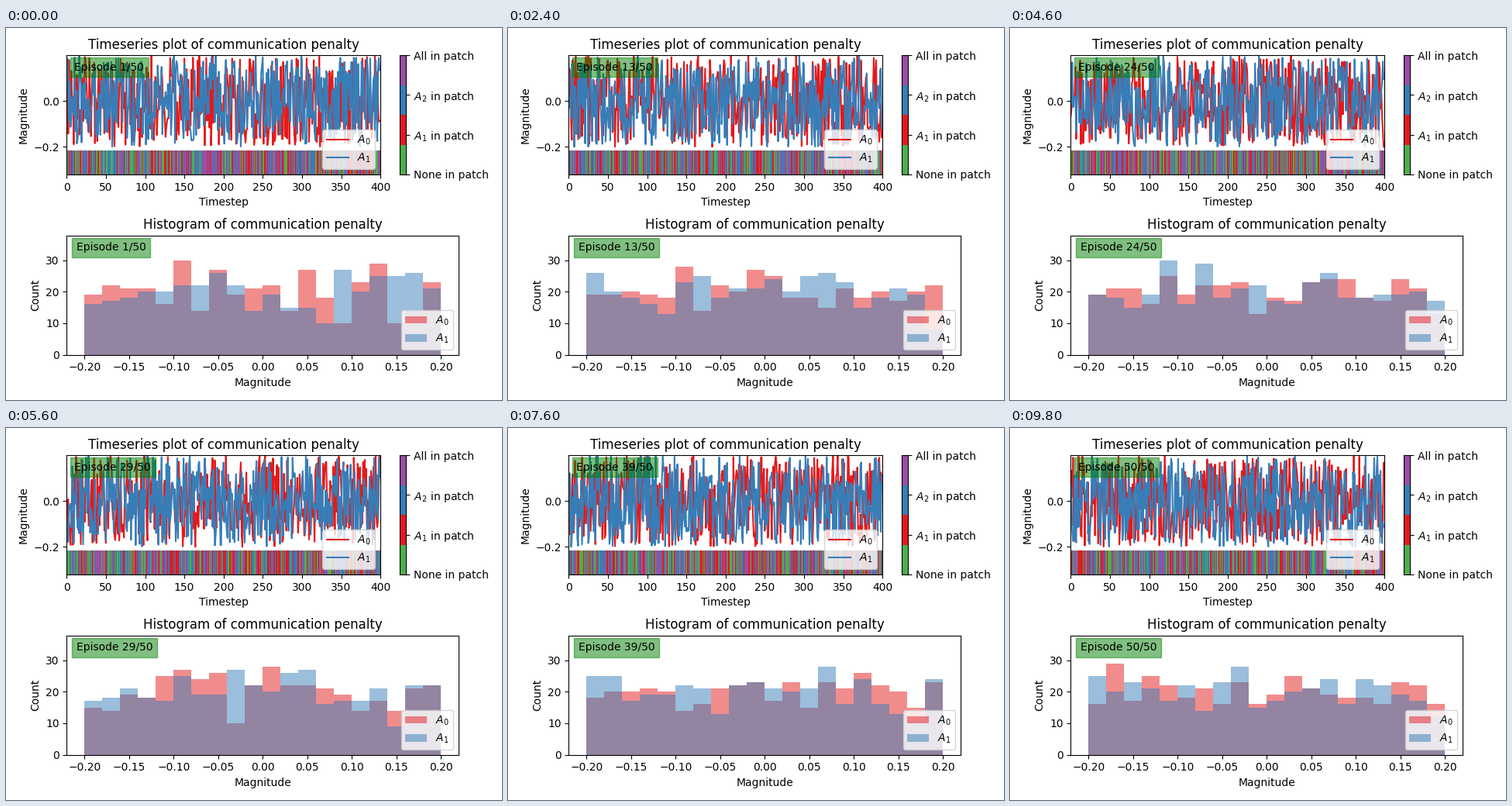
A matplotlib script that plays this animation: 640 px wide and 480 px high, repeating every 10 s.

```python
import numpy as np
import matplotlib.pyplot as plt
from matplotlib.animation import FuncAnimation
from matplotlib.colors import ListedColormap

W, H, DPI = 640, 480, 100
EPISODES, STEPS, BINS = 50, 400, 20
LIMIT = 0.2
MAX_COUNT = 36
GREEN, RED, BLUE, PURPLE = "#4daf4a", "#e41a1c", "#377eb8", "#984ea3"
PATCH_CMAP = ListedColormap([GREEN, RED, BLUE, PURPLE])
EDGES = np.linspace(-LIMIT, LIMIT, BINS + 1)

# Layout in pixels from the top left corner
LEFT, WIDTH, HEIGHT = 78.3, 506, 153.8
SERIES_TOP, HIST_TOP = 35.1, 267.8


def episode_data(episode):
    """Penalty signals of both agents and the patch state at every step."""
    rng = np.random.default_rng(episode)
    return rng.uniform(-LIMIT, LIMIT, (2, STEPS)), rng.integers(0, 4, STEPS)


def pixel_axes(left, top, width):
    return fig.add_axes([left / W, 1 - (top + HEIGHT) / H, width / W, HEIGHT / H])


def episode_label(ax):
    return ax.text(0.025, 0.945, "", transform=ax.transAxes, va="top", zorder=3,
                   bbox=dict(color="green", alpha=0.5))


plt.rcParams["font.family"] = "DejaVu Sans"
fig = plt.figure(figsize=(W / DPI, H / DPI), dpi=DPI, facecolor="white")

# Time series with the strip of patch states below it
series_ax = pixel_axes(LEFT, SERIES_TOP, 0.8 * WIDTH)
y_low, y_high = -0.32, LIMIT
strip_top = y_low + 0.2 * (y_high - y_low)
strip = series_ax.imshow(np.zeros((1, STEPS)), cmap=PATCH_CMAP, vmin=0, vmax=3,
                         extent=(0, STEPS, y_low, strip_top), aspect="auto",
                         interpolation="nearest")
lines = [series_ax.plot([], [], color=c, label=f"$A_{i}$")[0]
         for i, c in enumerate((RED, BLUE))]
series_ax.set(xlim=(0, STEPS), ylim=(y_low, y_high), yticks=[-0.2, 0.0],
              xlabel="Timestep", ylabel="Magnitude",
              title="Timeseries plot of communication penalty")
series_ax.legend(loc="lower right")

# Key of the patch states
key_ax = pixel_axes(LEFT + 0.85 * WIDTH, SERIES_TOP, HEIGHT / 20)
key_ax.imshow(np.arange(4)[:, None], cmap=PATCH_CMAP, extent=(0, 1, 0, 3),
              origin="lower", aspect="auto", interpolation="nearest")
key_ax.yaxis.tick_right()
key_ax.set_xticks([])
key_ax.set_yticks(range(4), ["None in patch", "$A_1$ in patch",
                             "$A_2$ in patch", "All in patch"])

# Histogram
hist_ax = pixel_axes(LEFT, HIST_TOP, WIDTH)
bars = [hist_ax.bar(EDGES[:-1], np.ones(BINS), EDGES[1] - EDGES[0], align="edge",
                    color=c, alpha=0.5, label=f"$A_{i}$")
        for i, c in enumerate((RED, BLUE))]
hist_ax.set(xlim=(-1.1 * LIMIT, 1.1 * LIMIT), ylim=(0, 1.05 * MAX_COUNT),
            yticks=[0, 10, 20, 30], xlabel="Magnitude", ylabel="Count",
            title="Histogram of communication penalty")
hist_ax.legend(loc="lower right")

labels = [episode_label(series_ax), episode_label(hist_ax)]


def update(frame):
    episode = frame + 1
    signals, states = episode_data(episode)
    for line, group, values in zip(lines, bars, signals):
        line.set_data(np.arange(STEPS), values)
        counts, _ = np.histogram(values, EDGES)
        for bar, count in zip(group, counts):
            bar.set_height(count)
    strip.set_data(states[None, :])
    for label in labels:
        label.set_text(f"Episode {episode}/{EPISODES}")
    return [*lines, strip, *labels]


anim = FuncAnimation(fig, update, frames=EPISODES, interval=200, repeat=True,
                     repeat_delay=0, blit=False)
plt.show()
```
